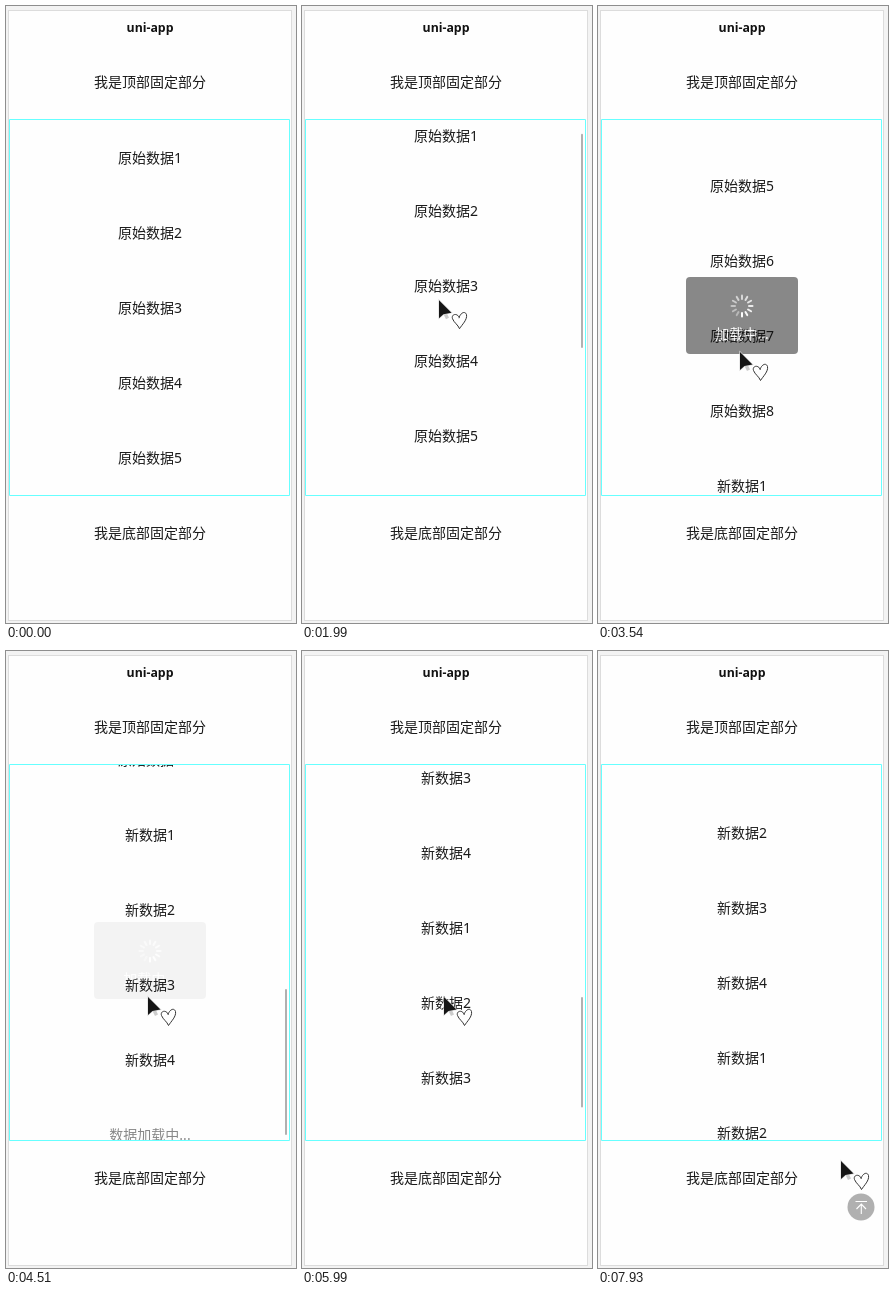
An HTML page with a canvas for the animation above (8000 ms loop, 290 by 617 pixels).

```html
<!DOCTYPE html>
<html lang="zh">
<head>
<meta charset="utf-8">
<style>
  html, body { margin: 0; width: 100%; height: 100%; overflow: hidden; background: #f3f3f3; }
  canvas { display: block; }
</style>
</head>
<body>
<canvas id="stage" width="290" height="617"></canvas>
<script>
const stage = document.getElementById('stage');
const page = stage.getContext('2d');
const layer = stage.cloneNode().getContext('2d');
let ctx = page;

const LOOP = 8000, TICK = 139, TICK_START = 200;
const CENTER = 144, TOP = 113, VIEW = 376, ROW = 75, FIRST_ROW = 152;
const FONT = '14px "Noto Sans", "Noto Sans CJK SC", "Noto Sans CJK", sans-serif';

const pulls = [
  { start: 1700, time: 960, distance: 272 },
  { start: 3850, time: 706, distance: 300 },
  { start: 5480, time: 676, distance: 300 },
  { start: 7750, time: 284, distance: -872 }
];
const loadStarts = [2820, 4497, 6400];
const LOAD_DELAY = 600, TOAST_TIME = 870;
const cursorStops = [
  [280, 110, 600], [1173, 121, 403], [1500, 137, 295], [2424, 137, 293], [2800, 142, 346],
  [6700, 142, 346], [7300, 255, 555], [7700, 255, 555], [7845, 243, 510]
];

const clamp = x => Math.min(1, Math.max(0, x));
const ease = x => x * x * (3 - 2 * x);
const scrollAt = t => pulls.reduce((sum, p) => sum + p.distance * ease(clamp((t - p.start) / p.time)), 0);

function cursorAt(t) {
  const next = Math.max(1, cursorStops.findIndex(stop => stop[0] >= t));
  const [t0, x0, y0] = cursorStops[next - 1], [t1, x1, y1] = cursorStops[next];
  const k = clamp((t - t0) / (t1 - t0));
  return [x0 + (x1 - x0) * k, y0 + (y1 - y0) * k];
}

function label(text, y, color = '#1a1a1a', font = FONT) {
  ctx.font = font;
  ctx.fillStyle = color;
  ctx.textAlign = 'center';
  ctx.fillText(text, CENTER, y + 5);
}

function box(x, y, w, h, color, radius = 0) {
  ctx.fillStyle = color;
  ctx.beginPath();
  ctx.roundRect(x, y, w, h, radius);
  ctx.fill();
}

function strokePath(d, color, width) {
  ctx.strokeStyle = color;
  ctx.lineWidth = width;
  ctx.stroke(new Path2D(d));
}

function fillPath(d, color) {
  ctx.fillStyle = color;
  ctx.fill(new Path2D(d));
}

function drawPage() {
  box(0, 0, 290, 617, '#f3f3f3');
  box(2, 4, 284, 611, '#dcdcdc');
  box(3, 5, 282, 609, '#fefefe');
  label('uni-app', 21, '#111', 'bold 12.3px "Open Sans", "Noto Sans", sans-serif');
  label('我是顶部固定部分', 76);
  label('我是底部固定部分', 527);
}

function drawList(t) {
  const scroll = scrollAt(t);
  const count = 8 + 4 * loadStarts.filter(s => t >= s + LOAD_DELAY).length;
  ctx.save();
  ctx.beginPath();
  ctx.rect(3, TOP, 281, VIEW);
  ctx.clip();
  for (let i = 0; i <= count; i++) {
    const y = FIRST_ROW + i * ROW - scroll;
    if (i === count) label('数据加载中...', y, '#888');
    else label(i < 8 ? '原始数据' + (i + 1) : '新数据' + (i % 4 + 1), y);
  }
  if (pulls.some(p => p.distance > 0 && t >= p.start && t < p.start + p.time + 500)) {
    const scale = 372 / (count * ROW + 48);
    box(279, TOP + 2 + scroll * scale, 2, VIEW * scale - 1.5, '#b0b0b0', 1);
  }
  ctx.restore();
  strokePath('M3.5 113.5H283.5V489.5H3.5Z', '#6ff', 1);
}

// Painted on its own layer so that the whole toast fades as one.
function drawToast(t) {
  const start = loadStarts.find(s => t > s && t < s + TOAST_TIME);
  if (start === undefined) return;
  ctx = layer;
  ctx.clearRect(0, 0, 290, 617);
  box(88, 271, 112, 77, 'rgba(17, 17, 17, .7)', 4);
  label('加载中...', 328, '#fff');
  ctx.save();
  ctx.translate(CENTER, 300);
  ctx.rotate(Math.floor(t / 83) * Math.PI / 6);
  for (let i = 0; i < 12; i++) {
    ctx.rotate(Math.PI / 6);
    box(-1, -11.5, 2, 5.5, `rgba(255, 255, 255, ${0.4 + 0.6 * i / 11})`, 1);
  }
  ctx.restore();
  ctx = page;
  ctx.globalAlpha = Math.min(clamp((t - start) / 200), clamp((start + TOAST_TIME - t) / 220));
  ctx.drawImage(layer.canvas, 0, 0);
  ctx.globalAlpha = 1;
}

function drawTopButton() {
  box(249.5, 542.5, 27, 27, '#b0b0b0', 13.5);
  strokePath('M257.5 550.5H269M263.3 563V553M258.5 558L263.3 553L268 558', '#fff', 1.1);
}

function drawCursor(t) {
  ctx.save();
  ctx.translate(...cursorAt(t));
  const arrow = 'M0 0V18L4.5 14L12.5 12.5Z';
  const heart = 'M20 17C18 12.5 12 14 13.5 18.5C15 22.5 19 24.5 20.5 28.5C23 24.5 28.5 19.5 27.5 14.5C26 10 21 13 20 18';
  fillPath('M4.5 14L7 19L10 17.5L8 13.3Z', '#ccc');
  strokePath(arrow, '#ddd', 1.2);
  fillPath(arrow, '#151515');
  strokePath(heart, '#333', 1);
  ctx.restore();
}

function render() {
  const clock = performance.now() % LOOP;
  const t = TICK_START + TICK * Math.floor((clock - TICK_START) / TICK);
  drawPage();
  drawList(t);
  drawToast(t);
  if (t >= 6200) drawTopButton();
  if (t >= 280) drawCursor(t);
  requestAnimationFrame(render);
}
render();
</script>
</body>
</html>
```
